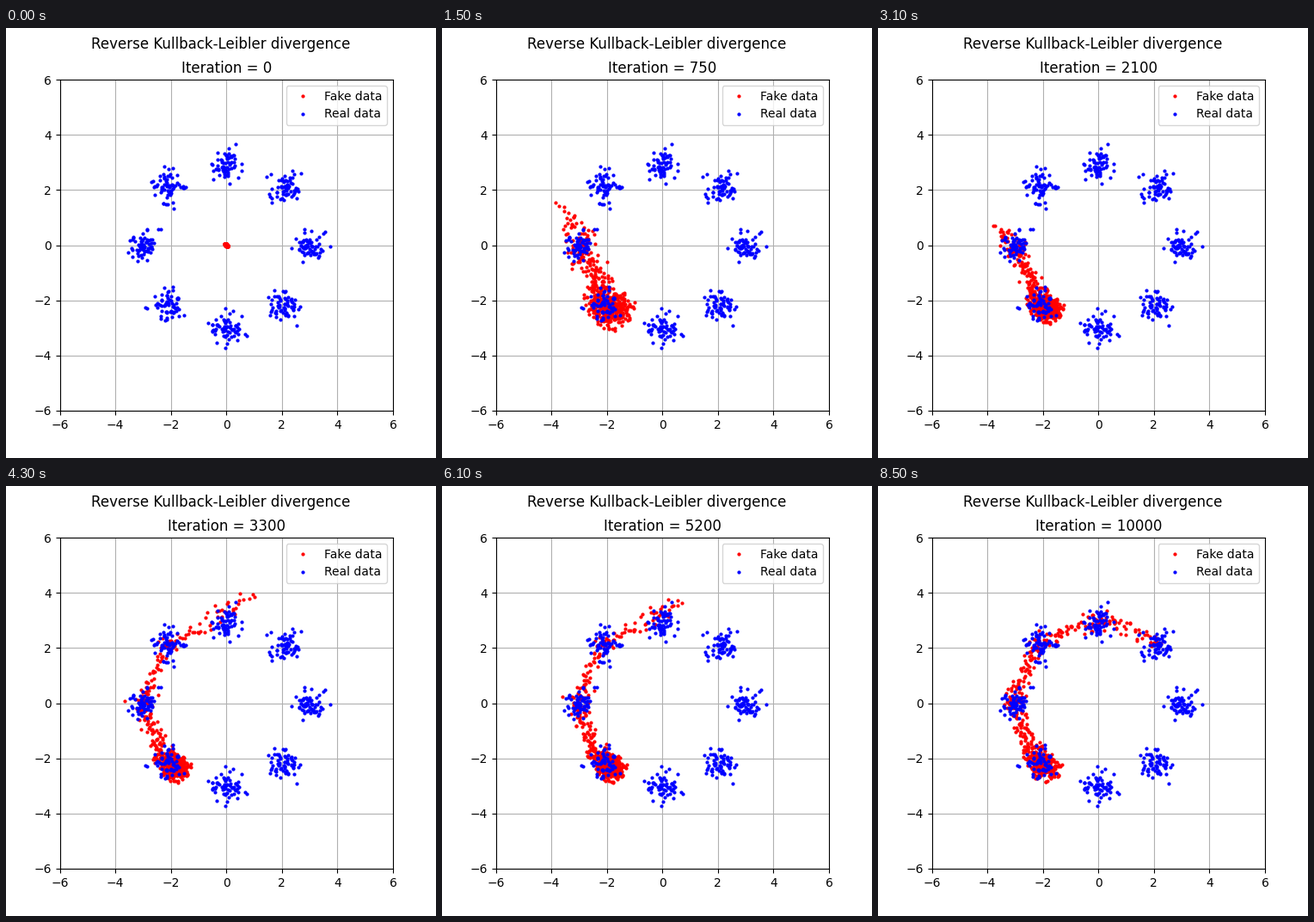
Recreate the animation shown at these times as a matplotlib script. Size 500 px wide and 500 px high, loop 8600 ms.

```python
import numpy as np
import matplotlib.pyplot as plt
from matplotlib.animation import FuncAnimation

FRAMES = 86
COUNT = 512
MODES = 8
rng = np.random.default_rng(7)

# Key moments of the arc: where its tip points (degrees), how strongly the
# samples crowd at its start, and how far the tip flies off the ring.
KEY_FRAMES = [15, 31, 43, 54, 61, 72, 85]
REACH = [158, 166, 73, 18, 77, 42, 49]
CROWDING = [3.3, 3.8, 4.4, 4.2, 4.0, 2.5, 2.4]
LIFT = [1.5, .95, 1.2, 3.1, .8, 1.0, 0]


def polar(radius, theta):
    return np.column_stack([radius * np.cos(theta), radius * np.sin(theta)])


def smooth(t):
    t = np.clip(t, 0, 1)
    return t * t * (3 - 2 * t)


def real_data():
    mode = np.arange(COUNT) % MODES
    noise = np.clip(rng.normal(0, .29, (COUNT, 2)), -.8, .8)
    return polar(3, mode * 2 * np.pi / MODES) + noise


REAL = real_data()
LATENT = np.sort(rng.normal(size=COUNT))
RANK = np.linspace(0, 1, COUNT)
NOISE = rng.normal(size=(COUNT, 2))


def iteration(n):
    return 50 * min(n, 20) + 100 * min(max(n - 20, 0), 40) + 200 * max(n - 60, 0)


def cloud(n):
    """Wide blob that bursts out of the origin and drifts to the lower left."""
    size = .025 + 2.5 * smooth(n / 3)
    centre = smooth(n / 9) * np.array([-2, -1])
    along = np.outer(LATENT, [-.75, .66])
    across = np.outer(NOISE[:, 0], [-.33, -.38])
    return centre + size * (along + across)


def arc(n):
    """Samples strung along the ring of modes, gathered near each mode."""
    reach, crowding, lift = (np.interp(n, KEY_FRAMES, v) for v in (REACH, CROWDING, LIFT))
    settle = smooth((n - 15) / 45)
    theta = np.radians(237 - (237 - reach) * RANK ** crowding)
    theta -= .55 / MODES * np.sin(MODES * theta)
    near = .5 + .5 * np.cos(MODES * theta)
    tip = np.clip((RANK - .9) / .1, 0, 1) ** 4
    radius = 3 - (.4 - .3 * settle) * (1 - near) + lift * tip
    spread = .26 + .13 * (1 - smooth((n - 15) / 15))
    sigma = spread * (.6 + .4 * near) * (1 - .3 * RANK)
    return polar(radius, theta) + sigma[:, None] * NOISE


def fake_data(n):
    mix = smooth((n - 3) / 12)
    return (1 - mix) * cloud(n) + mix * arc(n)


fig, ax = plt.subplots(figsize=(5, 5), dpi=100)
fig.suptitle("Reverse Kullback-Leibler divergence")
title = ax.set_title("Iteration = 0")
fake, = ax.plot([], [], "r.", markersize=4, label="Fake data")
ax.plot(*REAL.T, "b.", markersize=4, label="Real data")
ax.set(xlim=(-6, 6), ylim=(-6, 6), xticks=range(-6, 7, 2), yticks=range(-6, 7, 2))
ax.grid(True)
ax.legend(loc="upper right")


def update(n):
    fake.set_data(*fake_data(n).T)
    title.set_text(f"Iteration = {iteration(n)}")
    return fake, title


anim = FuncAnimation(fig, update, frames=FRAMES, interval=100, repeat=True, repeat_delay=0)
plt.show()
```
